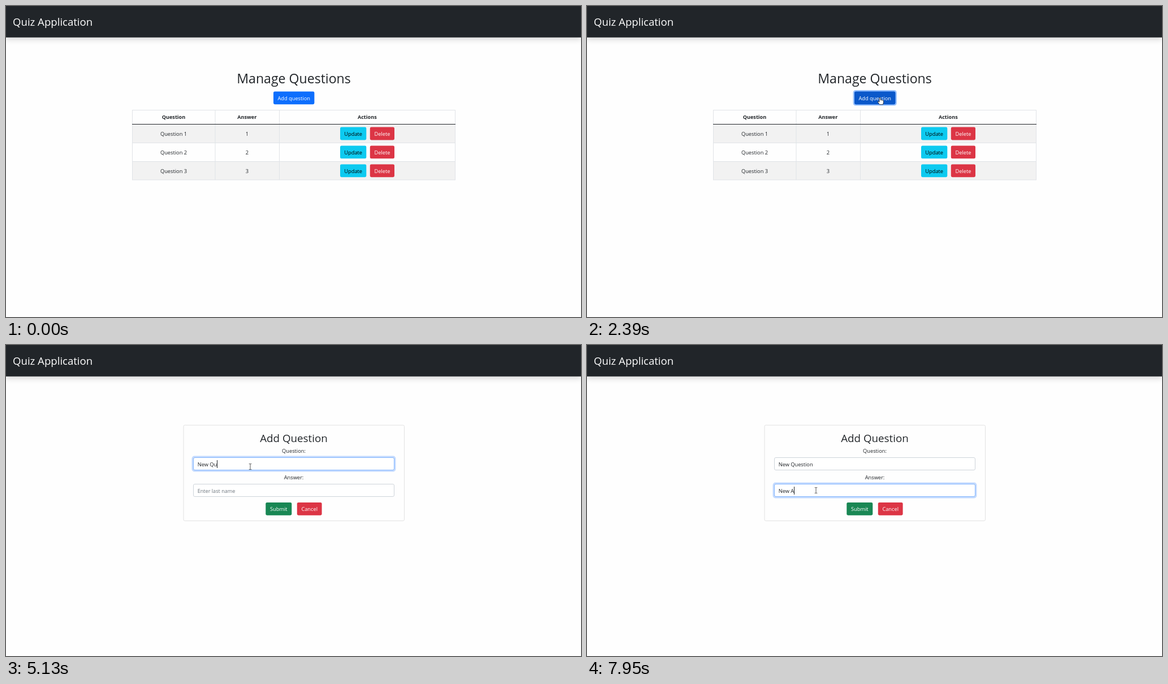
Write an HTML page that moves like this. It is 1017 px wide and 551 px high and loops after 8000 ms.

```html
<!DOCTYPE html>
<html lang="en">
<head>
<meta charset="utf-8">
<title>Quiz Application</title>
<style>
  html, body { margin: 0; width: 100%; height: 100%; overflow: hidden; background: #fefefe; }
  svg { display: block; width: 100%; height: 100%; }
  text { font: 9.25px "Open Sans", "Noto Sans", sans-serif; fill: #212529; white-space: pre; }
  .mid { text-anchor: middle; }
  .bold { font-weight: 700; font-size: 9.1px; }
  .h1 { font-size: 23.1px; }
  .h2 { font-size: 18.75px; }
  .brand { font-size: 18.6px; fill: #fff; }
  .hint { fill: #6c757d; font-size: 9.15px; }
  .light { fill: #fff; }
  .dark { fill: #000; }
  .bar { fill: #212529; filter: drop-shadow(0 4.8px 4.8px rgba(0, 0, 0, .15)); }
  .line { fill: none; stroke: #e0e3e7; }
  .ring { fill: none; stroke-width: 2.4; }
</style>
</head>
<body>
<svg id="stage" viewBox="0 0 1017 551" xmlns="http://www.w3.org/2000/svg"></svg>
<script>
const LOOP = 8000, PRESS = 2390, FORM_OPEN = 2460;
const FOCUS_QUESTION = 3430, FOCUS_ANSWER = 6610, FADE = 150;

// Pointer path: time, x, y
const PATH = [
  [730, 894, 500], [1080, 665, 301], [1500, 549, 198], [1570, 533, 178],
  [1780, 518, 164], [1920, 518, 162], [2940, 518, 162], [3430, 432, 215.5],
  [6130, 432, 215.5], [6340, 415, 236], [6610, 405, 257.5]
];
// While the pointer moves, the screen refreshes in 70 ms steps
const MOVES = [[730, 1920], [3010, 3570], [6200, 6760]], STEP = 70;

const KEYS_QUESTION = [4170, 4370, 4500, 4640, 4860, 5060, 5140, 5220, 5300, 5380, 5460, 5540];
const KEYS_ANSWER = [7280, 7480, 7640, 7810, 7950];

const THEMES = {
  primary: ['#0d6efd', '#0b5ed7', 'light'],
  info: ['#0dcaf0', '#31d2f2', 'dark'],
  danger: ['#dc3545', '#bb2d3b', 'light'],
  success: ['#198754', '#157347', 'light']
};

const stage = document.getElementById('stage');
const clamp01 = v => Math.max(0, Math.min(1, v));
const between = (t, a, b) => t >= a && t < b;

function add(parent, tag, attrs = {}, content = '') {
  const node = document.createElementNS('http://www.w3.org/2000/svg', tag);
  for (const name in attrs) node.setAttribute(name, attrs[name]);
  node.textContent = content;
  return parent.appendChild(node);
}
const label = (parent, x, y, content, style = 'mid') =>
  add(parent, 'text', { x, y, class: style }, content);
const box = (parent, x, y, width, height, attrs) =>
  add(parent, 'rect', { x, y, width, height, ...attrs });
const show = (node, visible) => node.setAttribute('visibility', visible ? 'inherit' : 'hidden');

function button(parent, x, y, width, content, theme) {
  const height = 22.8, [fill, hoverFill, textStyle] = THEMES[theme];
  box(parent, x, y, width, height, { rx: 2.4, fill });
  const overlay = box(parent, x, y, width, height, { rx: 2.4, fill: hoverFill, opacity: 0 });
  label(parent, x + width / 2, y + 15.2, content, 'mid ' + textStyle);
  return { x, y, width, height, overlay };
}

function field(parent, y, hint, value, keys) {
  const x = 331, width = 356, height = 23;
  box(parent, x + .5, y + .5, width - 1, height - 1, { rx: 2.4, fill: '#fff', stroke: '#ced4da' });
  const focus = add(parent, 'g', { opacity: 0 });
  box(focus, x - 1.2, y - 1.2, width + 2.4, height + 2.4,
    { rx: 3.4, class: 'ring', stroke: 'rgba(13,110,253,.25)' });
  box(focus, x + .5, y + .5, width - 1, height - 1, { rx: 2.4, fill: 'none', stroke: '#86b7fe' });
  const placeholder = label(parent, 338.7, y + 15.8, hint, 'hint');
  const text = label(parent, 338.7, y + 15.8, '', '');
  const caret = box(parent, 338, y + 5, 1, 14, { fill: '#212529' });
  return {
    x, y, width, height,
    update(t, focusLevel, caretOn) {
      const typed = value.slice(0, keys.filter(k => t >= k).length);
      text.textContent = typed;
      show(placeholder, !typed);
      focus.setAttribute('opacity', focusLevel);
      caret.setAttribute('x', Math.round(338.2 + (typed ? text.getComputedTextLength() : 0)));
      show(caret, caretOn);
    }
  };
}

box(stage, 0, 0, 1017, 55.7, { class: 'bar' });
label(stage, 12, 34.7, 'Quiz Application', 'brand');

// List page
const list = add(stage, 'g');
label(list, 509, 137.3, 'Manage Questions', 'mid h1');
const addRing = box(list, 471.8, 150.1, 74.8, 25.2,
  { rx: 3.4, class: 'ring', stroke: 'rgba(49,132,253,.5)' });
const addButton = button(list, 473, 151.4, 72.4, 'Add question', 'primary');
const listButtons = [addButton];
const centers = [296.5, 426.3, 638.8];
['Question', 'Answer', 'Actions'].forEach((name, i) =>
  label(list, centers[i], 200.4, name, 'mid bold'));
for (let row = 0; row < 3; row++) {
  const top = 209.5 + row * 32.9;
  if (row % 2 === 0) box(list, 223, top, 572, 32.9, { fill: '#f2f2f2' });
  label(list, centers[0], top + 20.7, 'Question ' + (row + 1));
  label(list, centers[1], top + 20.7, row + 1);
  listButtons.push(
    button(list, 591, top + 5.1, 46.3, 'Update', 'info'),
    button(list, 643.8, top + 5.1, 43.2, 'Delete', 'danger'));
}
add(list, 'path', {
  class: 'line',
  d: 'M223 184.5H795M223 242.5H795M223 275.5H795M223 308H795' +
     'M223.5 184V308M370 184V308M483.5 184V308M794.5 184V308'
});
box(list, 223, 209, 572, 1, { fill: '#212529' });

// Form page
const form = add(stage, 'g');
box(form, 314, 142, 390.5, 169.5, { rx: 2.4, fill: 'none', stroke: '#e2e2e2' });
label(form, 509, 171.6, 'Add Question', 'mid h2');
label(form, 509, 191.4, 'Question:');
label(form, 509, 238.4, 'Answer:');
const question = field(form, 199, 'Enter question', 'New Question', KEYS_QUESTION);
const answer = field(form, 246, 'Enter last name', 'New A', KEYS_ANSWER);
button(form, 459.3, 278.9, 46, 'Submit', 'success');
button(form, 514.8, 278.9, 43.8, 'Cancel', 'danger');
const titleArea = { x: 450, y: 154, width: 118, height: 22 };

// Pointer shapes
const pointer = add(stage, 'g');
const solid = { fill: '#fff', stroke: '#222', 'stroke-width': .8, 'stroke-linejoin': 'round' };
const shapes = {
  arrow: add(pointer, 'path', {
    ...solid, d: 'M.4 .4V10L2.7 7.9L4.1 11L5.5 10.4L4.1 7.4H7Z'
  }),
  hand: add(pointer, 'path', {
    ...solid,
    d: 'M-1 7V1Q0 -.6 1 1V4.6Q2 3.6 3 4.9Q4 4.1 4.9 5.3Q6.2 4.9 6.4 6.4V9.2L5.4 12.6H-.6L-3.6 8.2Q-3.6 6.6-2.2 7L-1 8.2Z'
  }),
  beam: add(pointer, 'path', {
    d: 'M-2.2 -5H-.6L0 -4.5L.6 -5H2.2M0 -4.5V4.5M-2.2 5H-.6L0 4.5L.6 5H2.2',
    fill: 'none', stroke: '#444', 'stroke-width': .9
  })
};

function pointerAt(t) {
  const next = PATH.findIndex(p => p[0] > t);
  if (next === 0) return PATH[0].slice(1);
  if (next < 0) return PATH[PATH.length - 1].slice(1);
  const [t0, x0, y0] = PATH[next - 1], [t1, x1, y1] = PATH[next];
  const k = (t - t0) / (t1 - t0);
  return [x0 + (x1 - x0) * k, y0 + (y1 - y0) * k];
}

const inside = (r, [x, y]) =>
  between(x, r.x, r.x + r.width) && between(y, r.y, r.y + r.height);

// Share of the last 150 ms spent over the button, which gives its fade
function hoverLevel(target, t) {
  let hits = 0;
  for (let k = 0; k < 10; k++) hits += inside(target, pointerAt(t - k * FADE / 10));
  return hits / 10;
}

function pointerShape(t) {
  const p = pointerAt(t - 30);
  if (t < FORM_OPEN) return listButtons.some(b => inside(b, p)) ? 'hand' : 'arrow';
  return [titleArea, question, answer].some(r => inside(r, p)) ? 'beam' : 'arrow';
}

function refreshTime(t) {
  const move = MOVES.find(([start, end]) => between(t, start, end));
  return move ? move[0] + Math.floor((t - move[0]) / STEP) * STEP : t;
}

function draw(now) {
  const clock = now % LOOP, t = refreshTime(clock);
  const onForm = t >= FORM_OPEN;
  show(list, !onForm);
  show(form, onForm);

  for (const b of listButtons) b.overlay.setAttribute('opacity', hoverLevel(b, t));
  addButton.overlay.setAttribute('fill', t >= PRESS ? '#0a58ca' : THEMES.primary[1]);
  show(addRing, between(t, PRESS, FORM_OPEN));

  const toQuestion = clamp01((t - FOCUS_QUESTION) / FADE);
  const toAnswer = clamp01((t - FOCUS_ANSWER) / FADE);
  question.update(clock, toQuestion - toAnswer,
    between(t, 3540, 4040) || between(t, 4170, 5740) || between(t, 6240, FOCUS_ANSWER));
  answer.update(clock, toAnswer, between(t, 6720, 7220) || t >= 7280);

  show(pointer, t >= 730);
  pointer.setAttribute('transform', `translate(${pointerAt(t)})`);
  const current = pointerShape(t);
  for (const name in shapes) show(shapes[name], name === current);
}

const begin = performance.now();
function tick() {
  draw(performance.now() - begin);
  requestAnimationFrame(tick);
}
tick();
</script>
</body>
</html>
```
